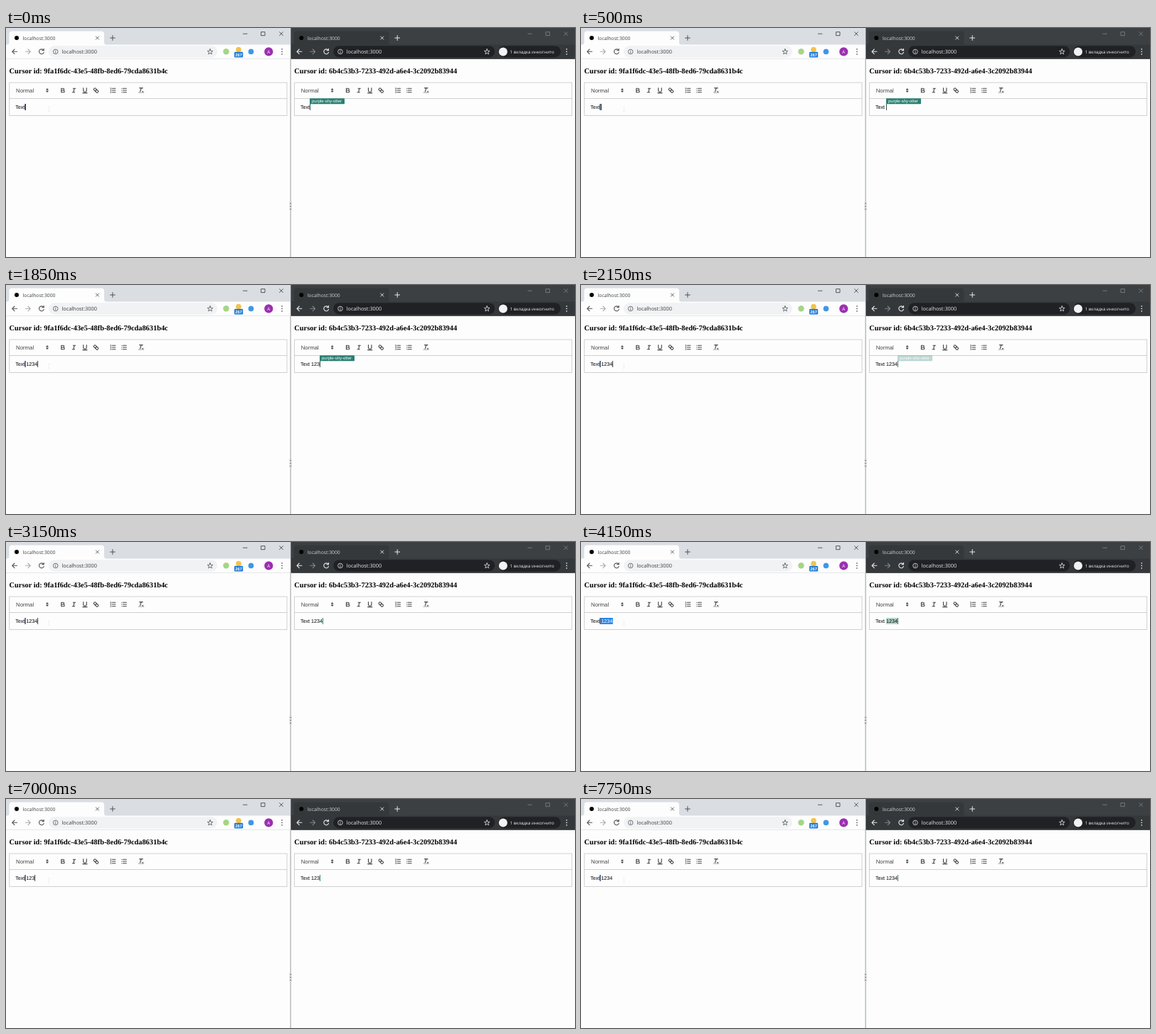
Recreate the animation shown at these times as an HTML page. Size 800 by 323 pixels, loop 8000 ms.

```html
<!DOCTYPE html>
<html lang="en">
<head>
<meta charset="utf-8">
<title>Shared editor</title>
<style>
  html, body { margin: 0; width: 100%; height: 100%; overflow: hidden; background: #fdfdfd; }
  svg { display: block; width: 800px; height: 323px; text-rendering: geometricPrecision; }
  text { white-space: pre; }
  .ui { font-family: "Open Sans", "Noto Sans", sans-serif; }
  .doc { font-family: "Liberation Sans", Arial, sans-serif; }
  .head { font: bold 10.36px "Liberation Serif", "Times New Roman", serif; }
  .line { fill: none; stroke-linecap: round; stroke-linejoin: round; }
</style>
</head>
<body>
<svg id="stage" viewBox="0 0 800 323"></svg>
<script>
const LOOP = 8000;
const PAGE_X = 400.7;
const FLAG_NAME = "purple-shy-otter";

const rect = (x, y, w, h, fill, more = "") =>
  `<rect x="${x}" y="${y}" width="${w}" height="${h}" fill="${fill}" ${more}/>`;
const circle = (x, y, r, fill, more = "") =>
  `<circle cx="${x}" cy="${y}" r="${r}" fill="${fill}" ${more}/>`;
const line = (d, color, width = 1, more = "") =>
  `<path class="line" d="${d}" stroke="${color}" stroke-width="${width}" ${more}/>`;
const text = (x, y, size, fill, str, cls = "ui", more = "") =>
  `<text class="${cls}" x="${x}" y="${y}" font-size="${size}" fill="${fill}" ${more}>${str}</text>`;
const group = (x, y, body, scale = 1) =>
  `<g transform="translate(${x} ${y}) scale(${scale})">${body}</g>`;

// Toolbar icons on an 18-unit grid
const ICONS = {
  bold: "M5 4H9.5a2.5 2.5 0 0 1 0 5H5ZM5 9h5.5a2.5 2.5 0 0 1 0 5H5Z",
  italic: "M7 4h6M5 14h6M8 14 10 4",
  underline: "M5 3V9a4 4 0 0 0 8 0V3M3.5 15.5h11",
  link: "M7 11 11 7M8.9 4.58a3.48 3.48 0 0 1 .36 4.68A3.48 3.48 0 0 1 4.58 8.9C3.19 7.5 2.04 6.4 4.22 4.22S7.5 3.19 8.9 4.58Z" +
    "M13.42 9.1a3.48 3.48 0 0 0-4.68-.36 3.48 3.48 0 0 0 .36 4.68c1.39 1.39 2.5 2.54 4.68.36S14.82 10.5 13.42 9.1Z",
  bullets: "M6 4h9M6 9h9M6 14h9M3 4h.01M3 9h.01M3 14h.01"
};

function toolIcon(cx, body) {
  return group(cx - 5, 83, body, 0.5556);
}

function toolbar() {
  const ink = "#444";
  const stroke = (d, w = 2) => line(d, ink, w);
  const numbers = stroke("M7 4h8M7 9h8M7 14h8") +
    stroke("M2.5 2.5 3.5 2V5.5M2.5 5.5h2M2.5 8c2-1 2.5.5 0 2.5h2M2.5 12.7h2L3.3 14c1.8 0 1.5 2-.8 1.6", 1);
  const clear = stroke("M5 3h8M6.5 12 9.35 3") + stroke("M11 11l4 4M15 11l-4 4", 1.5) + stroke("M2.5 14.5h6", 1);
  const picker = `<path d="M7 11 9 13 11 11ZM7 7 9 5 11 7Z" fill="${ink}" stroke="${ink}" stroke-width="2" stroke-linejoin="round"/>`;
  return text(14, 91, 7.8, ink, "Normal", "doc") +
    toolIcon(58, picker) +
    toolIcon(80, stroke(ICONS.bold)) +
    toolIcon(95.5, stroke(ICONS.italic)) +
    toolIcon(111, stroke(ICONS.underline)) +
    toolIcon(126.5, stroke(ICONS.link)) +
    toolIcon(150.5, numbers) +
    toolIcon(166, stroke(ICONS.bullets)) +
    toolIcon(190, clear);
}

function page(id) {
  return text(4.6, 64, 10.36, "#000", `Cursor id: ${id}`, "head") +
    rect(4.8, 77, 390.2, 46.5, "none", 'stroke="#c6c6c6" stroke-width=".8"') +
    line("M4.8 99.5H395", "#c6c6c6", 0.8) + toolbar();
}

function star(x, y, color) {
  const points = Array.from({ length: 10 }, (_, i) => {
    const r = i % 2 ? 1.7 : 4, a = i * Math.PI / 5;
    return `${(x + r * Math.sin(a)).toFixed(2)} ${(y - r * Math.cos(a)).toFixed(2)}`;
  });
  return line(`M${points.join("L")}Z`, color, 0.8);
}

function browser(c) {
  const dots = [29.8, 33.3, 36.8].map(y => circle(388 + c.menuShift, y, 0.85, c.icon)).join("");
  return rect(0, 0, 400, 24, c.strip) +
    `<path d="M0 24Q4.5 24 4.5 20V8.5Q4.5 4.5 8.5 4.5H134Q138 4.5 138 8.5V20Q138 24 142 24Z" fill="${c.bar}"/>` +
    rect(0, 23.5, 400, 20, c.bar) +
    line("M0 43.4H400", c.edge, 0.7) +
    circle(15, 14, 3, "#000") +
    text(23.6, 16.6, 6.8, c.tabText, "localhost:3000") +
    line("M126.4 11.9l4.2 4.2M130.6 11.9l-4.2 4.2", c.icon, 0.9) +
    line("M146.5 14h6.8M149.9 10.6v6.8", c.icon, 1) +
    line("M333.5 8.2h5.5M359 5.6h5v5h-5ZM384.5 5.6l5 5M389.5 5.6l-5 5", c.control, 0.7) +
    line("M15.6 33.3H8.8M12 30l-3.3 3.3L12 36.6", c.icon, 1.1) +
    line("M27.4 33.3h6.8M31 30l3.3 3.3L31 36.6", c.forward, 1.1) +
    line("M52.5 31a3.4 3.4 0 1 0 .7 3.3M53.2 29.3v2.5h-2.5", c.icon, 1.1) +
    rect(60, 25.2, c.pillEnd - 60, 16.2, c.pill, 'rx="8.1"') +
    circle(69.7, 33.4, 3.3, "none", `stroke="${c.icon}" stroke-width=".8"`) +
    line("M69.7 33.2v1.9M69.7 31.6v.1", c.icon, 0.8) +
    text(78.4, 36.1, 7.35, c.url, "localhost:3000") +
    star(c.starX, 33.6, c.icon) + dots;
}

const light = {
  strip: "#dadde2", bar: "#fdfdfd", edge: "#dcdee0", icon: "#505357", forward: "#a8abae",
  tabText: "#3c4043", url: "#3a3d40", pill: "#f0f2f3", control: "#222",
  pillEnd: 297, starX: 287, menuShift: 0
};
const dark = {
  strip: "#3c4043", bar: "#35383b", edge: "#2d3033", icon: "#e6e8ea", forward: "#84878a",
  tabText: "#cfd2d5", url: "#e6e8ea", pill: "#202124", control: "#8d9093",
  pillEnd: 287, starX: 276, menuShift: 0
};

const extensions =
  circle(309.5, 33.3, 4.2, "#a5d587") +
  circle(327, 30.6, 3.8, "#f3c34b") +
  rect(321, 33.8, 12.2, 7.6, "#1d7bd8", 'rx="1.2"') +
  text(327.1, 39.9, 5.9, "#fff", "267", "doc", 'text-anchor="middle" font-weight="bold"') +
  circle(344.5, 33.4, 3.8, "#3f97e8") +
  circle(369.3, 33.4, 6.1, "#9c2fb0") +
  text(369.3, 35.7, 6.3, "#fff", "A", "ui", 'text-anchor="middle"');

const privateBadge =
  rect(292, 25.2, 87.5, 16.2, "#202124", 'rx="8.1"') +
  circle(298.6, 33.4, 6, "#f1f3f4") +
  text(308.4, 35.8, 6.15, "#f1f3f4", "1 вкладка инкогнито");

const divider =
  rect(399.4, 43, 1.5, 280, "#b9bbbd") +
  rect(398.6, 245, 3, 13, "#d5d6d7") +
  [247.5, 251.5, 255.5].map(y => circle(400.1, y, 0.7, "#555")).join("");

const pointer = line("M59.6 111.5h1.6M60.4 111.5v6M59.6 117.5h1.6", "#e4e4e4", 0.5);

document.getElementById("stage").innerHTML =
  rect(0, 0, 800, 323, "#fdfdfd") +
  browser(light) + extensions +
  group(400.3, 0, browser(dark) + privateBadge) +
  divider +
  page("9fa1f6dc-43e5-48fb-8ed6-79cda8631b4c") +
  group(PAGE_X, 0, page("6b4c53b3-7233-492d-a6e4-3c2092b83944")) +
  pointer +
  rect(28, 107, 16.8, 8.9, "#2583e6", 'id="selection"') +
  rect(PAGE_X + 28.5, 107, 16.8, 8.9, "#b4d3cb", 'id="highlight"') +
  `<text class="doc" x="13.2" y="114" font-size="7.2">Text <tspan id="leftDigits"></tspan></text>` +
  `<text class="doc" x="${13.2 + PAGE_X}" y="114" font-size="7.2">Text <tspan id="rightDigits"></tspan></text>` +
  rect(26.4, 107, 1.3, 8.9, "#16305f") +
  rect(0, 107, 0.8, 8.9, "#111", 'id="caret"') +
  rect(0, 107, 0.9, 8.9, "#1f7769", 'id="remote"') +
  `<g id="flag">${rect(0, 99.2, 49, 8.1, "#2a8072", 'rx=".8"')}${text(3, 104.9, 6, "#fff", FLAG_NAME, "doc")}</g>`;

const part = id => document.getElementById(id);
const [selection, highlight, leftDigits, rightDigits, caret, remote, flag] =
  ["selection", "highlight", "leftDigits", "rightDigits", "caret", "remote", "flag"].map(part);

// Each track holds [start time, value]; the count is characters after "Text", space included.
const leftTrack = [[0, 0], [150, 1], [1100, 2], [1300, 3], [1500, 4], [1850, 5],
  [6650, 2], [6750, 3], [6900, 4], [7050, 5]];
const rightTrack = [[0, 0], [150, 1], [1150, 2], [1350, 3], [1600, 4], [1900, 5],
  [6750, 2], [6850, 3], [6950, 4], [7150, 5]];
const blinkTrack = [[0, 1], [2400, 0], [2850, 1], [3400, 0], [6650, 1], [7750, 0]];
const flagTrack = [[0, 1], [2100, 0.65], [2150, 0.3], [2250, 0]];

function at(track, t) {
  let value = track[0][1];
  for (const [start, v] of track) if (t >= start) value = v;
  return value;
}
const between = (t, from, to) => t >= from && t < to;
const caretX = n => n ? 24.5 + 4 * n : 26.5;
const digits = n => "1234".slice(0, Math.max(0, n - 1));
const show = (el, on) => el.setAttribute("opacity", Number(on));

function draw(t) {
  const left = at(leftTrack, t), right = at(rightTrack, t);
  const selected = between(t, 3450, 6650);
  const marked = between(t, 3550, 6650);
  leftDigits.textContent = digits(left);
  rightDigits.textContent = digits(right);
  leftDigits.setAttribute("fill", selected ? "#fff" : "#000");
  show(selection, selected);
  show(highlight, marked);

  caret.setAttribute("x", caretX(left) - 0.2 + (left ? 0 : 0.9));
  show(caret, at(blinkTrack, t));

  const remoteCount = between(t, 6650, 6750) ? 2 : right;
  remote.setAttribute("x", PAGE_X + caretX(remoteCount) - 0.1);
  remote.setAttribute("fill", t < 2100 ? "#1d3f3a" : "#1f7769");

  const flagCount = t < 500 ? 0 : right;
  flag.setAttribute("transform", `translate(${PAGE_X + caretX(flagCount) - 0.2} 0)`);
  show(flag, at(flagTrack, t));
}

const begin = performance.now();
function tick() {
  draw((performance.now() - begin) % LOOP);
  requestAnimationFrame(tick);
}
draw(0);
requestAnimationFrame(tick);
</script>
</body>
</html>
```
